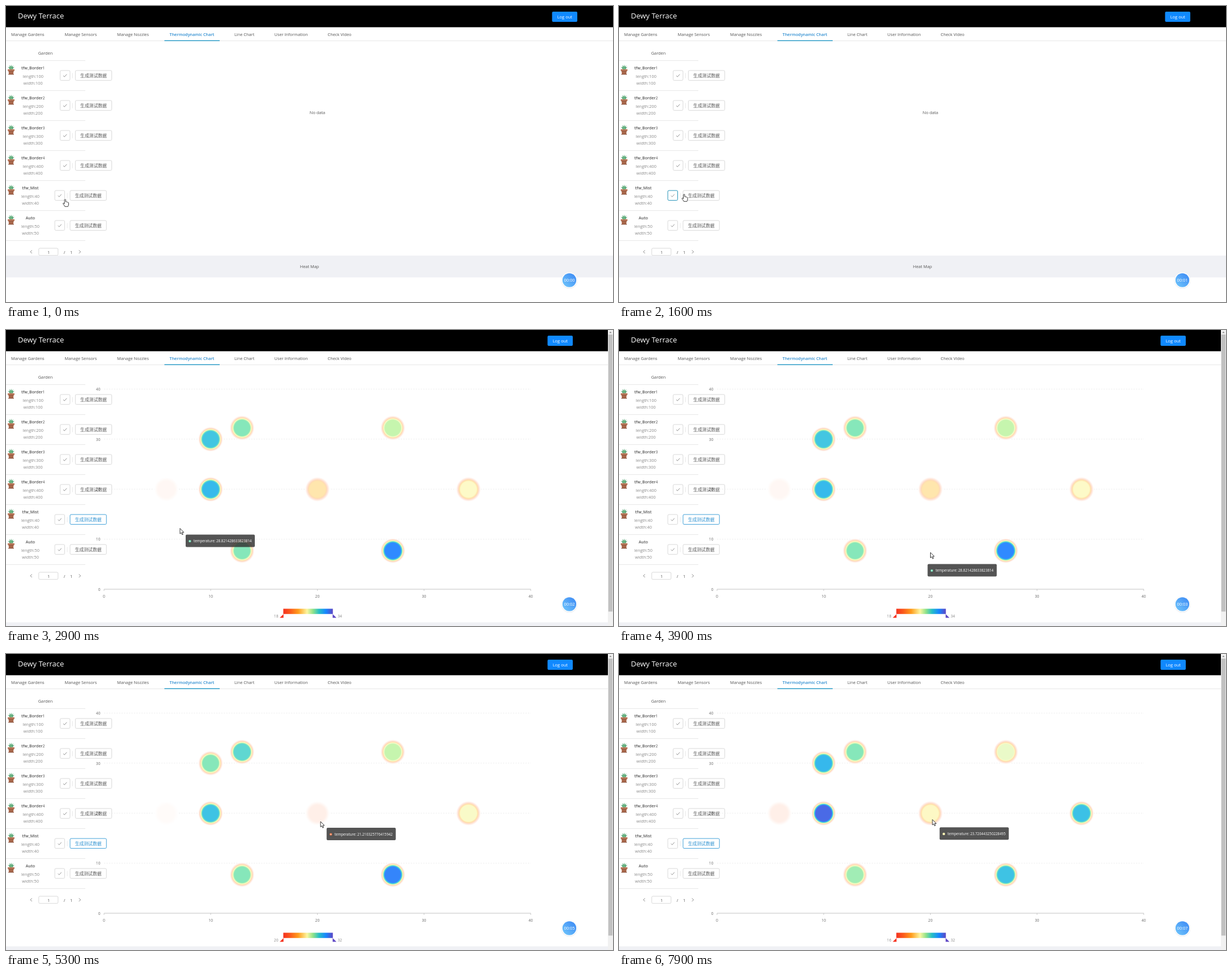
Write an HTML page that moves like this. It is 1071 by 523 pixels and loops after 8000 ms.

```html
<!DOCTYPE html>
<html lang="en">
<head>
<meta charset="utf-8">
<title>Garden dashboard</title>
<style>
  html, body { margin: 0; width: 100%; height: 100%; overflow: hidden; background: #fff; }
  svg { display: block; width: 1071px; height: 523px; font-family: "Open Sans", "Noto Sans CJK SC", "Noto Sans CJK", sans-serif; }
</style>
</head>
<body>
<svg id="stage" viewBox="0 0 1071 523"></svg>
<script>
const NS = 'http://www.w3.org/2000/svg';
const stage = document.getElementById('stage');

function add(parent, tag, attrs = {}, content) {
  const el = document.createElementNS(NS, tag);
  for (const key in attrs) el.setAttribute(key, attrs[key]);
  if (content !== undefined) el.textContent = content;
  parent.appendChild(el);
  return el;
}
const group = (parent, attrs) => add(parent, 'g', attrs);
const rect = (parent, x, y, width, height, fill, more) =>
  add(parent, 'rect', { x, y, width, height, fill, ...more });
const path = (parent, d, fill, more) => add(parent, 'path', { d, fill, ...more });
const stroke = (parent, d, color, width = 1, more) =>
  path(parent, d, 'none', { stroke: color, 'stroke-width': width, ...more });

// Text is placed by its visual middle.
function label(parent, x, y, content, { size = 7.4, fill = '#555', anchor = 'middle', weight = 400 } = {}) {
  return add(parent, 'text', {
    x, y: y + size * 0.36, fill, 'font-size': size, 'font-weight': weight, 'text-anchor': anchor
  }, content);
}

function gradient(type, id, attrs, stops) {
  const el = add(defs, type, { id, ...attrs });
  return stops.map(([offset, color, opacity = 1]) =>
    add(el, 'stop', { offset, 'stop-color': color, 'stop-opacity': opacity }));
}

const defs = add(stage, 'defs');
rect(stage, 0, 0, 1071, 523, '#fff');

// Header and tabs
rect(stage, 0, 0, 1071, 37.5, '#000');
label(stage, 21, 17, 'Dewy Terrace', { size: 13, fill: '#fff', anchor: 'start' });
const logout = group(stage);
rect(logout, 963.5, 10, 44.5, 18, '#1089ff', { rx: 2 });
label(logout, 985.8, 19, 'Log out', { fill: '#fff', size: 7.5 });

stroke(stage, 'M0 61.5H1071', '#e8e8e8');
[[9, 'Manage Gardens'], [103.5, 'Manage Sensors'], [196, 'Manage Nozzles'], [403, 'Line Chart'],
 [473.5, 'User Information'], [567.5, 'Check Video']]
  .forEach(([x, name]) => label(stage, x, 50, name, { anchor: 'start' }));
label(stage, 328, 50, 'Thermodynamic Chart', { fill: '#2b8cd0', weight: 600, size: 7.3 });
rect(stage, 279.5, 60.6, 97.5, 1.4, '#2196c4');

// Garden list
label(stage, 69.5, 83.5, 'Garden');
stroke(stage, 'M0 96.5H140', '#e8e8e8');

function drawPlant(parent, y) {
  const g = group(parent, { transform: `translate(9 ${y})` });
  path(g, 'M-1 8L-5.5 2L-2.5 3L-3 -1L-.5 2L0 -2L1.5 2L3.5 -1L3 3L5.8 2L1 8Z', '#58a878');
  path(g, 'M-1 7L-.2 0L1 7Z', '#8ccb96');
  path(g, 'M-4.8 8H4.8L3.7 15.5H-3.7Z', '#a8674b');
  rect(g, -6, 6.2, 12, 3, '#b9775a', { rx: .5 });
  rect(g, -4.5, 9.2, 9, .8, '#8b503a');
  rect(g, -5, 14.5, 10, 1.2, '#8b503a', { rx: .5 });
}

function drawRow(name, digit, size, i) {
  const g = group(stage, { transform: `translate(0 ${i * 53})` });
  const shift = digit ? 0 : -9.4;
  const mid = digit ? 47.8 : 43;
  drawPlant(g, 105.5);
  const title = label(g, mid, 109.5, name, { weight: 600, fill: '#555', size: 7.1 });
  add(title, 'tspan', { 'font-weight': 400 }, digit);
  label(g, mid, 124, 'length:' + size, { fill: '#888' });
  label(g, mid, 136, 'width:' + size, { fill: '#888' });
  const box = { rx: 2, stroke: '#d9d9d9' };
  const check = rect(g, 95.5 + shift, 114, 17.4, 17.4, '#fff', box);
  stroke(g, `M${101 + shift} 123l2.2 2.2l4 -4.6`, '#888', .9);
  stroke(g, `M${117.5 + shift} 118.5v9`, '#e4e4e4', .8);
  const button = rect(g, 122.4 + shift, 114, 64.2, 17.4, '#fff', box);
  const text = label(g, 154.5 + shift, 122.9, '生成测试数据', { size: 7.8 });
  stroke(g, 'M0 149.5H140', '#e8e8e8');
  return { check, button, text };
}
const rows = [
  ['tfw_Border', '1', 100], ['tfw_Border', '2', 200], ['tfw_Border', '3', 300],
  ['tfw_Border', '4', 400], ['tfw_Mist', '', 40], ['Auto', '', 50]
].map((row, i) => drawRow(...row, i));
const activeRow = rows[4];

// Pagination
stroke(stage, 'M46 431.7L42.8 434.3L46 437', '#777', .8);
rect(stage, 57.8, 428, 34, 12.7, '#fff', { rx: 2, stroke: '#d9d9d9' });
label(stage, 75, 435, '1');
label(stage, 103, 435, '/');
label(stage, 115, 435, '1');
stroke(stage, 'M128.6 431.7L131.8 434.3L128.6 437', '#777', .8);

// State before data arrives
const empty = group(stage);
label(empty, 549.5, 188.5, 'No data');
rect(empty, 0, 441, 1071, 38.5, '#f0f1f5');
label(empty, 535.5, 460.8, 'Heat Map');

// Chart
const chart = group(stage);
rect(chart, 0, 516.5, 1062, 6.5, '#f0f1f5');
rect(chart, 1062, 0, 9, 523, '#f1f1f1');
rect(chart, 1062.8, 8, 7.4, 489.5, '#c1c1c1');
path(chart, 'M1064.3 5.3L1066.5 2.8L1068.7 5.3Z', '#888');

const axis = { size: 6.7, fill: '#666' };
for (let i = 0; i <= 4; i++) {
  const x = 173 + i * 188.2, y = 458 - i * 88.4;
  label(chart, x, 470.5, i * 10, axis);
  label(chart, 166.5, y + .3, i * 10, { ...axis, anchor: 'end' });
  stroke(chart, `M${x} 458v3`, '#bbb', .8);
  if (i) stroke(chart, `M173 ${y}H926`, '#e6e6e6', .7, { 'stroke-dasharray': '2.2 2.2' });
}
stroke(chart, 'M173 458H926', '#bbb', .9);

gradient('linearGradient', 'legend', {}, [
  [0, '#f5311f'], [.14, '#fb5a1c'], [.3, '#ff9c1c'], [.48, '#fcf6a0'], [.6, '#8fe28a'],
  [.72, '#26bfc6'], [.86, '#1686ff'], [1, '#5d46c4']
]);
rect(chart, 489.3, 492.5, 87.4, 9.3, 'url(#legend)');
path(chart, 'M489.6 502V508.5H483Z', '#f5311f');
path(chart, 'M576.4 502V508.5H583Z', '#5d46c4');
const lowLabel = label(chart, 480.5, 506, '', { ...axis, anchor: 'end', fill: '#888' });
const highLabel = label(chart, 585.3, 506, '', { ...axis, anchor: 'start', fill: '#888' });

// Heat colours as they look on white
const ramp = [
  [0, 255, 255, 255], [.1, 255, 239, 232], [.22, 255, 224, 208], [.34, 255, 219, 178],
  [.42, 255, 231, 172], [.49, 253, 250, 200], [.55, 230, 250, 200], [.61, 198, 245, 174],
  [.67, 134, 231, 186], [.75, 92, 214, 210], [.81, 62, 195, 228], [.84, 52, 182, 238],
  [.9, 48, 138, 255], [.96, 74, 106, 230], [1, 92, 70, 200]
];
function heat(v) {
  const i = Math.max(1, ramp.findIndex(r => r[0] >= v));
  const a = ramp[i - 1], b = ramp[i], k = (v - a[0]) / (b[0] - a[0]);
  return `rgb(${[1, 2, 3].map(c => Math.round(a[c] + (b[c] - a[c]) * k))})`;
}

const RADIUS = 22.5, CORE = 13.5, STEPS = 18;
const falloff = k => 1 - k * k * (3 - 2 * k);
const spots = [[361, 193], [361, 281.5], [416.5, 173], [682.5, 173], [283, 281.5],
  [549.5, 281.5], [816, 281.5], [416.5, 390], [682.5, 390]].map(([cx, cy], i) => {
  const stops = gradient('radialGradient', 'spot' + i, {}, Array.from({ length: STEPS + 1 }, (_, n) => {
    const k = n / STEPS;
    return [(CORE + (RADIUS - CORE) * k) / RADIUS, '#fff', Math.min(1, (1 - k) * 5)];
  }));
  add(chart, 'circle', { cx, cy, r: RADIUS, fill: `url(#spot${i})` });
  return stops;
});

const datasets = [
  { at: 1800, low: 18, high: 34, values: [.8, .83, .67, .61, .05, .41, .49, .67, .9] },
  { at: 4500, low: 20, high: 32, values: [.67, .81, .745, .61, .025, .1, .5, .67, .91] },
  { at: 7200, low: 16, high: 32, values: [.835, .96, .67, .54, .1, .483, .815, .645, .81] }
];
let shown;
function showData(data) {
  if (!data || data === shown) return;
  shown = data;
  lowLabel.textContent = data.low;
  highLabel.textContent = data.high;
  data.values.forEach((v, i) => spots[i].forEach((stop, n) =>
    stop.setAttribute('stop-color', heat(v * falloff(n / STEPS)))));
}

// Tooltip
const tip = group(stage);
rect(tip, 0, 0, 122, 22, '#323232', { rx: 2, 'fill-opacity': .83 });
const tipDot = add(tip, 'circle', { cx: 7.4, cy: 11.6, r: 2.2 });
const tipHole = add(tip, 'circle', { cx: 7.4, cy: 11.6, r: .8, fill: '#fff' });
const tipText = label(tip, 14, 11.3, '', { size: 6.25, fill: '#fff', anchor: 'start', weight: 500 });
const readings = [
  { at: 2500, value: '28.821428633823814', color: '#70dcb4' },
  { at: 4500, value: '30.875069981512926', color: '#58a0f4' },
  { at: 5000, value: '21.210325776415942', color: '#f47848' },
  { at: 7200, value: '23.720443250228495', color: '#fbf4b4' }
];

// Recording clock
gradient('linearGradient', 'clock', { x1: 0, y1: 1, x2: 1, y2: 0 }, [[0, '#72c8fb'], [1, '#3a87f4']]);
add(stage, 'circle', { cx: 994, cy: 485, r: 14.3, fill: '#e6e8ec' });
add(stage, 'circle', { cx: 994, cy: 484.6, r: 13.8, fill: '#fff' });
add(stage, 'circle', { cx: 994, cy: 484.5, r: 12.2, fill: 'url(#clock)' });
const clock = label(stage, 994, 484.7, '', { fill: '#fff', size: 7.5 });

// Pointers, with the hot spot at 0,0
const outline = { stroke: '#222', 'stroke-width': .9, 'stroke-linejoin': 'round' };
const hand = path(stage, 'M-1.3 .8Q0 -.6 1 .8V4.5Q2.2 3.7 3 5Q4.3 4.3 4.8 5.6Q6 5.2 6 6.8V9.5Q5.8 11 4.8 12.8H-.6Q-2 10.2 -3.8 8.1Q-4.2 6.4 -2.6 6.9L-1.3 8Z', '#fff', outline);
const arrow = path(stage, 'M0 0V9.6L2.2 7.6L3.8 11.2L5.4 10.5L3.9 7H6.8Z', '#fff', outline);

const pointerPath = [
  [0, 104.5, 341.5], [600, 104.5, 341.5], [1200, 115, 332.5], [1900, 115, 332.5], [2500, 307, 350.5],
  [2900, 307, 350.5], [3400, 418, 394], [3900, 549.5, 393], [4100, 549.5, 393], [4600, 561, 344],
  [5100, 555, 296], [6400, 555, 296], [7000, 553, 292.5], [8000, 553, 292.5]
];
const tipPath = [
  [2500, 317, 361.5], [2900, 317, 361.5], [3400, 415, 410], [3900, 544.5, 413.5], [4200, 560, 405],
  [4600, 563, 399], [5150, 565.7, 307], [6400, 565.7, 307], [7000, 565.7, 306.3], [8000, 565.7, 306.3]
];
function follow(keys, t) {
  const i = Math.max(1, keys.findIndex(key => key[0] >= t));
  const [t0, x0, y0] = keys[i - 1], [t1, x1, y1] = keys[i];
  const k = 1 - falloff(Math.min(1, Math.max(0, (t - t0) / (t1 - t0))));
  return `translate(${x0 + (x1 - x0) * k} ${y0 + (y1 - y0) * k})`;
}

const latest = (list, t) => list.filter(item => item.at <= t).pop();
const show = (el, on) => el.setAttribute('visibility', on ? 'visible' : 'hidden');

function render(t) {
  const data = latest(datasets, t);
  const reading = latest(readings, t);
  showData(data);
  show(empty, !data);
  show(chart, data);
  logout.setAttribute('transform', `translate(${data ? -8 : 0} 0)`);

  activeRow.check.setAttribute('stroke', t >= 500 && t < 1700 ? '#2492b8' : '#d9d9d9');
  activeRow.button.setAttribute('stroke', t >= 1700 ? '#40a0d8' : '#d9d9d9');
  activeRow.text.setAttribute('fill', t >= 1700 ? '#2b90d0' : '#555');

  show(tip, reading);
  show(tipHole, reading && reading.at < 7200);
  if (reading) {
    tip.setAttribute('transform', follow(tipPath, t));
    tipText.textContent = 'temperature: ' + reading.value;
    tipDot.setAttribute('fill', reading.color);
  }

  show(hand, t < 2100);
  show(arrow, t >= 2100);
  for (const pointer of [hand, arrow]) pointer.setAttribute('transform', follow(pointerPath, t));
  clock.textContent = '00:0' + Math.floor(t / 1000);
}

const start = performance.now();
function tick() {
  const elapsed = (performance.now() - start) % 8000;
  render(Math.floor(elapsed / 100) * 100);
  requestAnimationFrame(tick);
}
tick();
</script>
</body>
</html>
```
